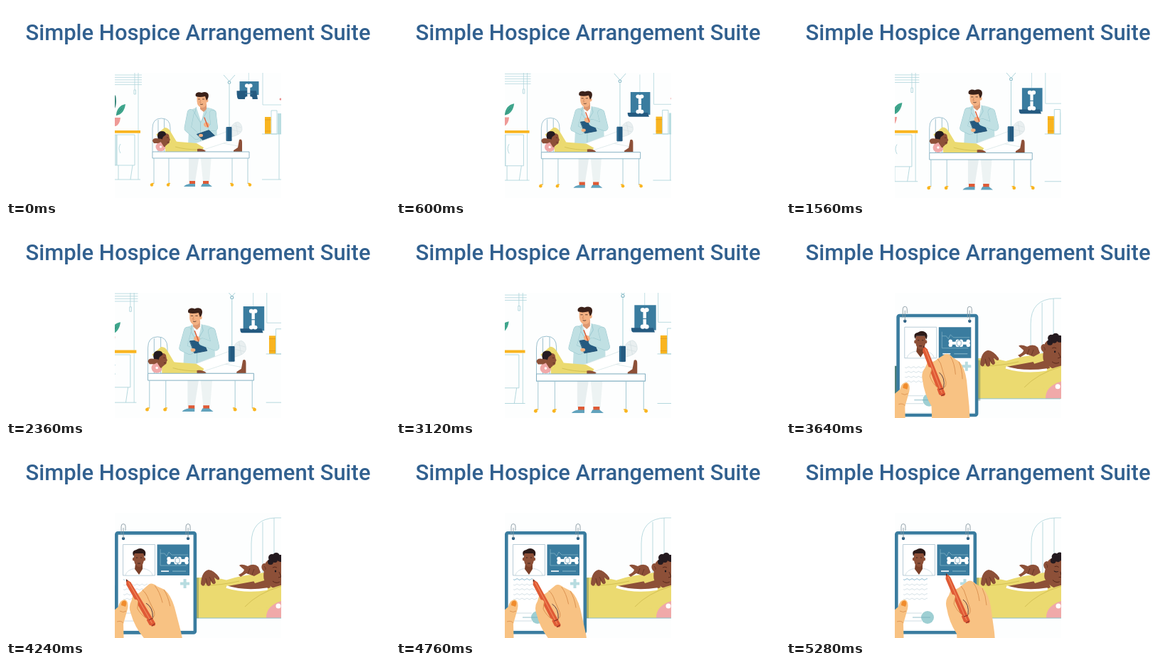
Write an HTML page with a canvas that moves like this. It is 540x270 px and loops after 5320 ms.

```html
<!DOCTYPE html>
<html lang="en">
<head>
<meta charset="utf-8">
<title>Hospital scene</title>
<style>
html, body { margin: 0; width: 100%; height: 100%; overflow: hidden; background: #fff; }
h1 {
  position: absolute; left: 0; top: 18px; width: 540px; margin: 0;
  font: 500 31px/40px Roboto, "Open Sans", sans-serif;
  color: #31608f; text-align: center; white-space: nowrap;
}
canvas { position: absolute; left: 0; top: 0; }
</style>
</head>
<body>
<canvas width="540" height="270"></canvas>
<h1>Simple Hospice Arrangement Suite</h1>
<script>
const g = document.querySelector('canvas').getContext('2d');
const LOOP = 5320, CUT = 3340;
const LINE = '#a9d2d9', TEAL = '#3a7c9f', NAVY = '#245a80', COAT = '#c0e0e3',
  YELLOW = '#ebda70', BROWN = '#8d5038', HAIR = '#3b2119', PEACH = '#f3b183',
  SKIN = '#f8c283', FOLD = '#d98f4e', GOLD = '#f9b520', PINK = '#f0a9a9', RED = '#df5a35';

const clamp = v => Math.max(0, Math.min(1, v));
const ease = v => (v = clamp(v), v * v * (3 - 2 * v));
const lerp = (a, b, k) => a + (b - a) * k;

function path(d, fill, stroke, width = 0.8) {
  const p = new Path2D(d);
  if (fill) { g.fillStyle = fill; g.fill(p); }
  if (stroke) { g.strokeStyle = stroke; g.lineWidth = width; g.stroke(p); }
}
function box(x, y, w, h, fill, stroke, width = 0.8, r = 0) {
  g.beginPath();
  g.roundRect(x, y, w, h, r);
  if (fill) { g.fillStyle = fill; g.fill(); }
  if (stroke) { g.strokeStyle = stroke; g.lineWidth = width; g.stroke(); }
}
function oval(x, y, rx, ry, fill, turn = 0) {
  g.beginPath();
  g.ellipse(x, y, rx, ry, turn, 0, 7);
  g.fillStyle = fill;
  g.fill();
}
// Draws inside a frame that is moved, turned and scaled about (x, y).
function group(x, y, dx, dy, turn, sx, sy, draw) {
  g.save();
  g.translate(x + dx, y + dy);
  g.rotate(turn);
  g.scale(sx, sy);
  g.translate(-x, -y);
  draw();
  g.restore();
}
const zoom = (s, draw) => group(274, 181, 0, 0, 0, s, s, draw);
const shift = (dx, dy, draw) => group(0, 0, dx, dy, 0, 1, 1, draw);

function bone(x, y, len) {
  for (const side of [-1, 1]) for (const end of [0, len])
    oval(x + side * 2.4, y + end, 2.9, 2.7, '#fff');
  box(x - 2, y, 4, len, '#fff');
}

function room() {
  for (let y = 97; y < 114; y += 3.4) path(`M130 ${y}H191`, null, LINE, 0.7);
  path('M181 94V119M186 94V175M186 179V244', null, LINE, 0.7);
  box(180, 118, 2.4, 6, '#fff', LINE);
  path('M155 154C155 146 160 139 168 138C167 146 163 153 155 154Z', '#3fa58c');
  path('M149 150C148 140 150 131 154 125C156 135 155 144 149 150Z', '#2f8275');
  path('M155 154L163 144', null, '#2f8275', 0.7);
  path('M140 157H161Q160 167 154 169H140Z', '#ef9a97');
  box(130, 175, 59, 3.8, GOLD);
  box(130, 181, 26, 43, '#cfe6e9');
  box(130, 181, 51, 43, null, LINE);
  path('M156 181V224M161 194Q157 200 161 207M178 224L175 244M158 224V244', null, LINE);
  path('M125 244H189M360 244H415', null, LINE);
  path('M361 94V139H415', null, LINE, 0.7);
  oval(386, 131, 1.5, 1.5, '#e88b8b');
  box(373, 147, 8, 33, '#fff', LINE);
  box(382, 151, 8, 29, '#b9dde1');
  box(364, 156, 8.5, 24, GOLD);
  path('M364 160H372.5M364 176H372.5', null, '#de951c', 0.7);
  path('M360 180H415M384 180V244', null, LINE);
}

function xray(t) {
  const swing = -13 * Math.exp(-t / 450) * Math.cos(Math.PI * t / 600);
  const fold = Math.exp(-t / 130);
  const end = 153 - 9 * fold, roll = 5.5 + 6.5 * fold;
  shift(0, swing, () => {
    path('M341.3 95V119', null, LINE, 0.6);
    box(328.5, 119, 27, end - 119 - roll / 2, TEAL);
    path(`M324.5 ${end - roll}H352L354 ${end}H327Q324.5 ${end} 324.5 ${end - roll}Z`, NAVY);
    bone(341.3, 125, 21 - 3 * fold);
    path('M336 136H346.5', null, TEAL, 1);
  });
}

function doctor(t) {
  const k = ease(t / 520), lean = 9 * (1 - k);
  const jot = k * Math.sin(t / 75);
  path('M257 196H274L266 247H257Z', '#e8eff0');
  path('M272 196H290L286 247H277Z', '#edf3f3');
  path('M258 246H266V251H258ZM277 246H285V251H277Z', RED);
  path('M266 250V254H250Q252 251 258 250ZM276 250H285L290 254H274Z', '#62a3bd');

  shift(lean * 0.5, 0, () => {
    path('M254 147Q262 142 272 142Q287 143 291 148L293 205H251Z', COAT);
    path('M263 142L270 163L275 142Z', '#fff');
    path('M263 142L261 151L269 164L277 150L275 142M269 164V200', null, '#92c4cc', 0.7);
  });

  shift(lean, 0, () => {
    path('M264 137H273V145L269 149L264 145Z', '#dd9770');
    path('M259.5 126H273V135Q273 143 266.5 143Q260 142 259.5 134Z', PEACH);
    oval(273.5, 133, 2, 2.6, PEACH);
    path('M258 127C256 122 262 120 266 122C273 119 278 123 275 130L273 133L271 127Q263 129 258 127Z', HAIR);
    path('M261 131H264M267 131H270M264 138Q266 139 268 138', null, HAIR, 0.7);
    path('M265 132L263.5 135.5H265.5', null, '#cc8059', 0.7);
  });

  g.lineCap = g.lineJoin = 'round';
  const hx = lerp(280, 267, k), hy = lerp(165, 158.5, k);
  const sleeve = d => {
    path(d, null, '#92c4cc', 9.8);
    path(d, null, COAT, 9);
  };
  sleeve(`M${257 + lean * 0.3} 150L${251 + lean * 0.5} 172L${lerp(268, 260, k)} ${lerp(183, 176, k)}`);
  group(270.5, 170, 10.5 * (1 - k), 12 * (1 - k), -0.25 * (1 - k), lerp(1.1, 1, k), lerp(0.72, 1, k), () =>
    path('M260 163.5L276 161.5L282 176L266 179Z', NAVY, '#1d4c70'));
  sleeve(`M${288 + lean * 0.3} 151L293 171L${hx + 9} ${hy + 6}`);
  oval(lerp(274, 264, k), lerp(182, 175, k), 3, 2.2, PEACH);
  oval(hx + 2, hy + 2 + jot * 0.5, 4, 3.4, PEACH, 0.5);
  path(`M${hx - 1 + jot} ${hy - 8}L${hx + 4 + jot} ${hy + 5}`, null, RED, 1.3);
  g.lineCap = 'butt';
}

function bed() {
  path('M206 205V172Q206 158 218.5 158Q231 158 231 172V205M214 160V205M222.5 159V205', null, '#8fb8c8');
}

function patient(t) {
  // Head resting on a bent arm.
  path('M211 181L223 171Q228 171 231 176L240 191L230 197L220 190Z', YELLOW);
  oval(217.5, 198, 7, 6.5, PINK);
  oval(217.5, 198, 1.6, 1.6, '#fff');
  path('M219 181Q225 177 229 181L230 186L231 188L230 190Q230 195 226 195L232 198H222L217 190Z', BROWN);
  path('M213 183Q213 176 219 176Q225 176 225 181L221 184L219 189L214 188Z', '#241b20');
  path('M206 190Q206 186 211 186L219 187L221 190L214 193H208Z', BROWN);
  path('M226 185H228M226.5 191.5H229', null, '#4d251b', 0.7);

  // Free leg, then the plastered one in its sling.
  path('M266 195L300 192L326 197V205H262Z', '#fff', '#d6e4e6', 0.7);
  path('M320 203L326 199L328 188Q332 186 332 192V205H320Z', BROWN);
  path('M264 194L312 176L318 189L272 204Z', '#fff', '#d6e4e6', 0.7);
  path('M315 174Q318 164 326 163Q332 165 332 174Q331 181 317 184Z', '#e9eff0', '#d3dfe2', 0.6);
  path('M320 168L331 171M318 174L330 177M323 164L326 181', null, '#d3dfe2', 0.6);
  path('M314 110V171M306 97L314 106L322 97', null, LINE, 0.9);
  oval(314, 107.5, 2.3, 2.3, '#83b8c5');
  oval(314, 107.5, 1.3, 1.3, '#fff');
  box(309.5, 170, 8, 20, NAVY, null, 0, 1);
  path('M311 170V190', null, TEAL, 1);

  const b = 0.4 * Math.sin(t / 420);
  path(`M224 197Q232 ${189 + b} 243 ${191 + b}L268 ${193 + b}L278 199L275 205H224Z`, YELLOW);
  path('M238 198Q252 202 270 202', null, '#cbb94c', 0.7);
  path('M269 201Q276 200 281 204L278 206H269Z', BROWN);
}

function frame() {
  box(206, 205, 136, 9, '#fff', '#82afc2', 0.9);
  path('M208 214V250M229 214V250M318 214V250M340 214V250', null, '#9ac3cf');
  for (const x of [205, 228, 318, 343]) {
    oval(x, 251.5, 2.2, 2.2, GOLD);
    path(`M${x} 249.5H${x < 300 ? x + 3 : x - 3}`, null, GOLD, 1.3);
  }
}

function ward(t) {
  zoom(1 + t * 0.000028, room);
  zoom(1 + t * 0.00004, () => {
    xray(t);
    bed();
    doctor(t);
    patient(t);
    frame();
  });
}

function sleeper(t) {
  const nod = ease((t - 4750) / 530), b = 0.5 * Math.sin(t / 400);
  path('M345 242V137Q345 102 379 101H400M361 107V242M377 101V242', null, LINE);
  path('M150 196H170V242H150Z', '#4e7f78');
  path(`M255 187Q282 182 310 ${189 + b}Q338 ${180 + b} 356 181L400 178V242H255Z`, YELLOW);
  path('M312 197L350 190L367 184L372 199Q352 206 312 198Z', BROWN);
  path('M310 198Q336 206 368 201', null, '#fff', 3.5);
  path('M345 184Q352 178 366 178L370 187L350 193Z', YELLOW);

  // Raised hand by the ear.
  path('M330 184L327 181Q334 178 335 174L328 168Q331 165 340 169Q349 164 355 170L358 178L349 183L338 179Z', BROWN);
  path('M340 180L343 172M346 181L349 173', null, '#633224', 0.8);

  group(379, 190, 0, -nod, nod * 0.14, 1, 1, () => {
    path('M365 164Q370 156 390 157V203Q373 202 364 190Q360 185 365 164Z', BROWN);
    oval(364, 171, 4.5, 6, BROWN, -0.3);
    path('M363 169Q366 171 365 174', null, '#633224', 0.8);
    for (const [x, y, r] of [[374, 157, 5], [380, 155, 5], [386, 158, 5], [372, 163, 4], [378, 160, 4]])
      oval(x, y, r, r, '#241a1f');
    if (nod < 0.5) oval(379, 176, 1.2, 1.5, '#241a1f');
    else path('M375 177Q378 179 381 177', null, '#241a1f', 1);
    path('M375 171Q378 169 381 171M384 177L387 184L383 185M375 190Q380 194 385 191', null, '#522519', 0.9);
  });
  path('M334 228Q350 205 390 195V222Q358 232 334 228Z', YELLOW);
  path('M387 197Q354 207 336 226M279 196Q302 196 328 190', null, '#cdb94d', 0.8);
  path('M366 242Q365 224 390 217V242Z', PINK);
  oval(383, 225, 3.5, 3.5, '#fff');

  path('M274 194Q275 176 285 174Q293 175 300 185Q301 189 297 188L293 185L295 192Q293 196 290 193L288 189L288 195Q285 199 282 195L281 192L279 196Q276 198 274 194Z', BROWN);
  path('M286 184L290 192M281 186L283 194', null, '#633224', 0.8);
  path('M266 242H387', null, '#8bbfc7', 1);
}

function wave(y, color, end = 199) {
  let d = `M165 ${y}`;
  for (let x = 165.5; x <= end; x += 0.5) d += `L${x} ${y + Math.sin((x - 165) * 0.9) * 0.8}`;
  path(d, null, color, 0.8);
}

function clipboard(t) {
  box(266, 185, 5, 57, 'rgba(70, 105, 80, 0.35)');
  box(155.3, 122.3, 110.5, 140, '#fff', TEAL, 4.6, 2);
  path('M158 126H263M158 259H263', null, '#d9e8ed', 0.7);
  for (const x of [165, 256]) {
    oval(x, 130, 2.2, 2.2, NAVY);
    path(`M${x - 3} 125V113Q${x - 3} 109.5 ${x} 109.5Q${x + 3} 109.5 ${x + 3} 113V119M${x} 130V115`, null, '#8a9aa3', 0.9);
  }

  box(164.5, 138.5, 45, 43.5, '#fff', '#a7bfcd');
  path('M168 182Q169 174 182 172H192Q205 174 206 182Z', '#fff', '#c8d8df');
  path('M182 165H192V173L187 181L181 173Z', '#7b4029');
  path('M180 151H194V161Q192 170 187 170Q181 169 180 161Z', BROWN);
  oval(179.5, 159, 1.6, 2.5, BROWN);
  oval(194.5, 159, 1.6, 2.5, BROWN);
  path('M179 155Q176 147 183 146Q189 142 194 146Q198 149 195 156L193 151H181Z', '#2c1a18');
  path('M183 157H185M189 157H191M185 165H189', null, '#2c1a18', 0.8);

  box(212.5, 138.5, 45.5, 43.5, TEAL);
  path('M217 145V168H254M217 151H223L226 155L229 149L233 153H256', null, '#7fb0c5', 0.8);
  group(226, 161, 0, 0, -Math.PI / 2, 1, 1, () => {
    bone(226, 164, 10);
    bone(226, 179, 10);
  });
  box(238, 157.5, 6, 7, '#fff', TEAL, 0.6, 2);
  path('M218 176H229', null, '#fff', 1.6);
  path('M234 176H253', null, '#85b6c8', 1.1);
  path('M249.5 187H253.5V191.5H258V195.5H253.5V200H249.5V195.5H245V191.5H249.5Z', '#b7dce0');

  if (t > 4200) wave(187.5, '#62a1bf', lerp(165, 199, clamp((t - 4200) / 700)));
  for (const y of [195, 201.5, 208.5, 215]) wave(y, '#c4d5dc');
  path('M165 235H191M165 246H191', null, '#c4d5dc', 0.8);
  oval(199, 241, 9, 9, '#9ecfd3');
  path('M178 241H203', null, '#74aebb', 0.8);
}

function thumb() {
  path('M146 290V236L158 226Q160 216 167 216Q173 218 171 229L165 250L166 290Z', SKIN);
  path('M162 224Q162 217 167 217.5Q171 219 168 226Z', '#f08c2d');
  path('M160 232Q165 235 169 232M156 247Q162 245 165 249', null, FOLD, 0.8);
}

// Time, tip x, tip y, turn of the writing hand.
const STROKES = [
  [3340, 196, 176, 0.06], [3640, 193, 168, 0.04], [3920, 191, 173, 0],
  [4200, 167, 187, -0.12], [4900, 199, 187, -0.07],
  [5040, 203, 187, -0.04], [5280, 225, 179, 0], [5320, 226, 178, 0]
];

function writer(t) {
  let i = 0;
  while (i < STROKES.length - 2 && t >= STROKES[i + 1][0]) i++;
  const a = STROKES[i], b = STROKES[i + 1];
  const writing = a[0] === 4200;
  const part = clamp((t - a[0]) / (b[0] - a[0]));
  const k = writing ? part : ease(part);
  const [x, y, turn] = [1, 2, 3].map(n => lerp(a[n], b[n], k));
  const jot = writing ? 1.2 * Math.sin(t / 28) * Math.sin(part * Math.PI) : 0;
  group(225, 179, x - 225, y - 179 + jot, turn, 1, 1, () => {
    path('M226 228Q223 218 229 210L232 202Q240 203 246 197L256 190Q261 188 267 194L277 200Q285 209 288 226L293 262L300 345H246L240 264Q229 247 226 228Z', SKIN);
    path('M264 193Q270 202 272 218M276 200Q281 210 282 224M246 197Q251 202 253 211L259 229Q260 238 253 238', null, FOLD, 0.9);
    path('M225 179L231 184L258.5 245Q259 250 254 249L250 247L224.5 187Z', RED);
    path('M228 184L254 245', null, '#f28a5c', 1.2);
    path('M225 179L227 181L225 183Z', '#3f2c30');
    path('M250 240L256 238M253 249L258 246', null, '#8e3426', 1.2);
    path('M249 216Q258 223 256 237', null, '#48323a', 0.9);
    path('M226 226Q225 216 232 209Q238 208 238 213L236 222Q240 232 248 238L242 247Q230 239 226 226Z', SKIN);
    path('M238 213L236 222Q240 232 248 238', null, FOLD, 0.9);
  });
}

function closeUp(t) {
  const e = Math.exp((CUT - t) / 155);
  shift(-6 * e, 6 * e, () => sleeper(t));
  shift(16 * e, 26 * e, () => {
    clipboard(t);
    thumb();
  });
  shift(0, 26 * (1 - ease((t - CUT) / 280)), () => writer(t));
}

const start = performance.now();
function draw(now) {
  const t = Math.max(0, now - start) % LOOP;
  g.clearRect(0, 0, 540, 270);
  g.save();
  g.beginPath();
  g.rect(153, 94, 234, 176);
  g.clip();
  g.fillStyle = '#fdfefe';
  g.fill();
  if (t < CUT) ward(t);
  else closeUp(t);
  g.restore();
  requestAnimationFrame(draw);
}
draw(start);
</script>
</body>
</html>
```
